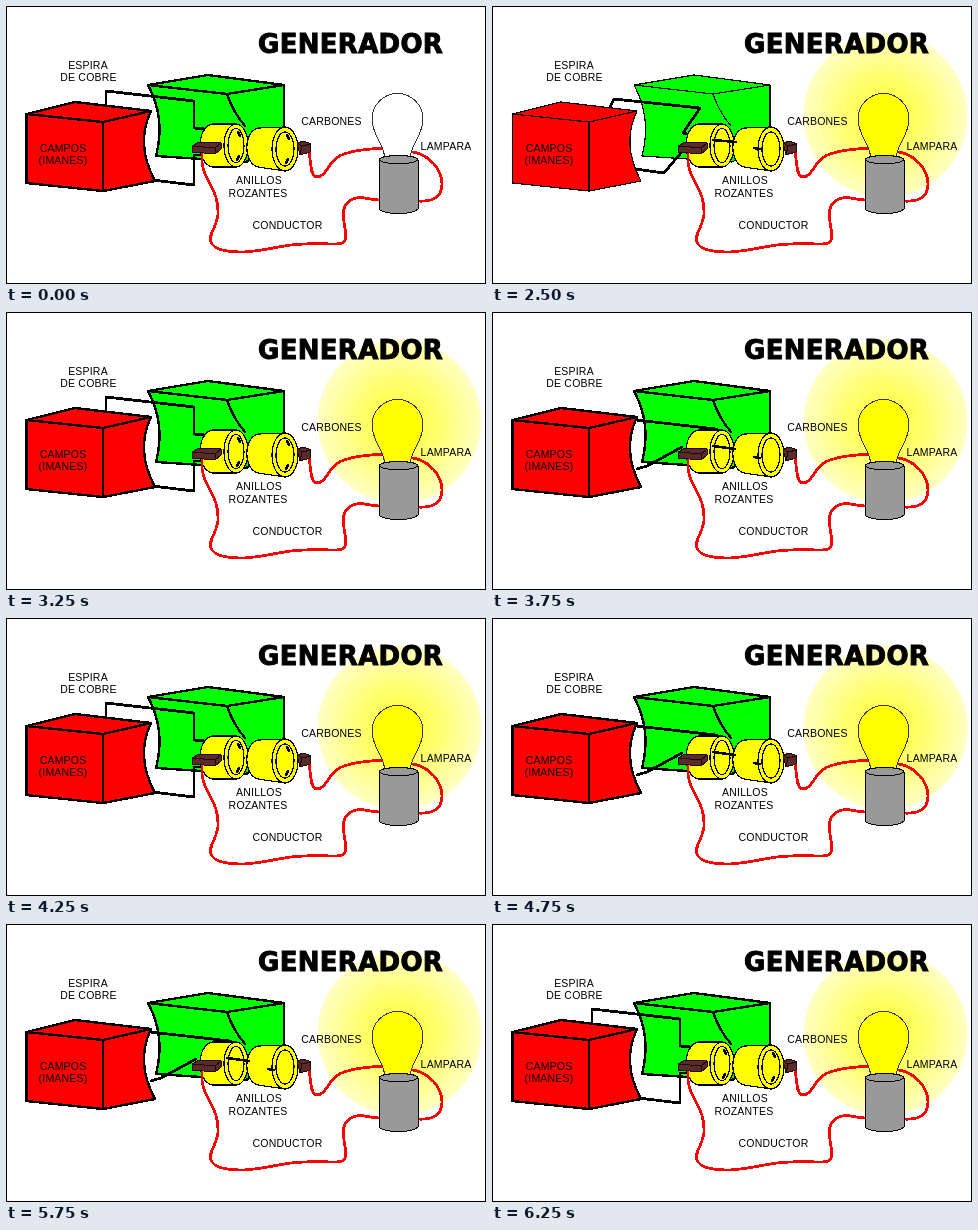
These frames come from a looping animation (480x278 px, 6.5 s). An HTML page:

```html
<!DOCTYPE html>
<html lang="es">
<head>
<meta charset="utf-8">
<title>Generador</title>
<style>
html, body { margin: 0; width: 100%; height: 100%; overflow: hidden; background: #fff; }
svg { display: block; width: 100vw; height: 100vh; }
path, ellipse, rect { stroke-linejoin: round; stroke-linecap: round; shape-rendering: crispEdges; }
text { font: 10.5px "Liberation Sans", Arial, sans-serif; letter-spacing: .2px; text-anchor: middle; }
.title { font: bold 26px "DejaVu Sans", sans-serif; letter-spacing: .3px; text-anchor: start; stroke: #000; stroke-width: .9px; }
.ink { fill: none; stroke: #000; }
.wire { fill: none; stroke: #f00; }
.ring { fill: #ff0; stroke: #000; stroke-width: 1.2; }
.brush { fill: #5b2a2a; stroke: #1c0808; stroke-width: 1; }
</style>
</head>
<body>
<svg viewBox="0 0 480 278" preserveAspectRatio="none">
  <defs>
    <radialGradient id="halo">
      <stop offset="0" stop-color="#ffff33"/>
      <stop offset=".5" stop-color="#ffff70"/>
      <stop offset="1" stop-color="#ffffc4"/>
    </radialGradient>
  </defs>
  <rect width="480" height="278" fill="#fff"/>
  <circle id="glow" cx="393.5" cy="109.5" r="82" fill="url(#halo)"/>
  <text class="title" x="252" y="47">GENERADOR</text>

  <g class="magnet" fill="#0f0" stroke="#000">
    <path d="M142 79L202 69L278 79V136L240 156L150 150Q160 112 142 79Z"/>
    <path class="ink" d="M142 79L221 88L278 79M221 88Q227 106 239 120"/>
  </g>

  <path id="loop" class="ink" stroke-width="2.8"/>

  <g class="ring">
    <path d="M206 118H230V161H206C190 157 190 122 206 118Z"/>
    <ellipse cx="230" cy="139.5" rx="12" ry="21.5"/>
    <ellipse cx="230" cy="139.5" rx="8" ry="17"/>
    <path d="M252 122L279 121V165L252 161C237 157 237 126 252 122Z"/>
    <ellipse cx="279" cy="143" rx="13" ry="22"/>
    <ellipse cx="279" cy="143" rx="9" ry="17"/>
  </g>
  <path id="marks" class="ink" stroke-width="2.6"/>

  <g class="magnet" fill="#f00" stroke="#000">
    <path d="M20.5 108L69 96L145 105Q129 138 149 175L97 185L20.5 177Z"/>
    <path class="ink" d="M20.5 108L97 116L145 105M97 116V185"/>
  </g>

  <g id="wires" class="wire">
    <path d="M196 148C195 160 198 167 203 176S213 195 212 208S202 228 205 236S222 246 236 246S270 241 285 239S317 238 330 238S340 230 338 216S339 197 347 193S362 194 373 194"/>
    <path d="M303 146C305 155 304 171 311 171S321 162 328 154S355 143 380 142"/>
    <path d="M407 146C424 149 436 164 436 178S426 196 411 195"/>
  </g>

  <g class="brush">
    <path d="M186 140L193 136L215 137V143L209 148L186 146Z"/>
    <path d="M186 140L209 142L215 137M209 142V148"/>
    <path d="M291 137L298 135L305 138L304 146L294 149Z"/>
    <path d="M291 137L296 140L305 138M296 140L294 149"/>
  </g>

  <path id="bulb" d="M379 154C379 138 366 130 366 113A25.5 25.5 0 0 1 417 113C417 130 404 138 404 154Z" stroke="#333"/>
  <path d="M373 154C375 148 410 148 412 154V203C407 209 378 209 373 203Z" fill="#999" stroke="#000"/>
  <path class="ink" d="M373 154C379 159 406 159 412 154"/>

  <g id="labels"></g>
  <rect class="ink" x=".5" y=".5" width="479" height="277"/>
</svg>
<script>
const LOOP = 6500, OFF = 2500, STEP = 250;
const get = id => document.getElementById(id);

const labels = [
  ["ESPIRA", 82, 63], ["DE COBRE", 82.5, 75], ["CAMPOS", 57, 146], ["(IMANES)", 57, 158],
  ["ANILLOS", 253, 178], ["ROZANTES", 252, 191], ["CONDUCTOR", 281.5, 223],
  ["CARBONES", 325.5, 118.5], ["LAMPARA", 440, 144]
];
get("labels").innerHTML = labels.map(([s, x, y]) => `<text x="${x}" y="${y}">${s}</text>`).join("");

// Quarter turns of the coil: coil path, contact marks, outline and wire widths
const poses = [
  { coil: "M118 101L122 93L208 102L191 127L199 129M143 163L172 167L193 142",
    marks: "M221 134L244 136M262 142L268 143", edge: 1.2, wire: 2.8 },
  { coil: "M118 105L224 117L229 121M145 157L155 154L190 135",
    marks: "M221 134L243 137M262 145L268 146", edge: 2.4, wire: 2.8 },
  { coil: "M143 110L178 113L194 128L204 130M143 155L190 161L217 163",
    marks: "M225 152L245 155M272 154L278 155", edge: 1.4, wire: 1 },
  { coil: "M100 103V85L188 95V122L199 123M146 174L188 179V149L199 149",
    marks: "M232 126L234 130M233 150L231 154M281 129L283 133M282 153L280 157", edge: 2.4, wire: 2.8 }
];

let last = "";
function draw(now) {
  const t = now % LOOP, lit = t >= OFF;
  const n = lit ? Math.floor((t - OFF) / STEP) % 4 : 3;
  const key = n + "/" + lit;
  if (key !== last) {
    last = key;
    const p = poses[n];
    get("loop").setAttribute("d", p.coil);
    get("marks").setAttribute("d", p.marks);
    get("wires").setAttribute("stroke-width", p.wire);
    document.querySelectorAll(".magnet").forEach(m => m.setAttribute("stroke-width", p.edge));
    get("glow").style.display = lit ? "" : "none";
    get("bulb").setAttribute("fill", lit ? "#ff0" : "#fff");
  }
  requestAnimationFrame(() => draw(performance.now()));
}
draw(performance.now());
</script>
</body>
</html>
```
